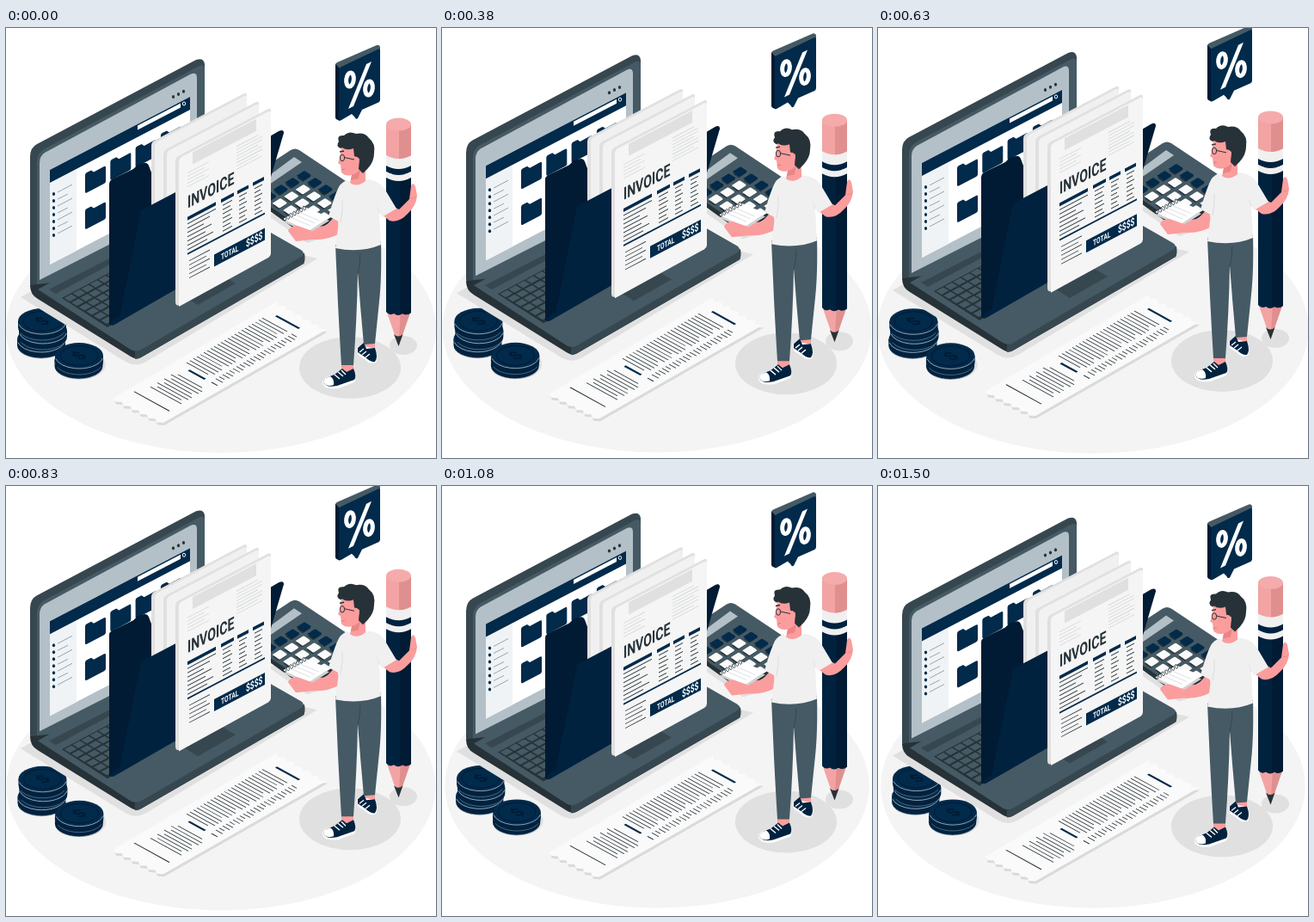
An HTML page with a canvas that plays this animation: 500x500 px, repeating every 1.54 s.

```html
<!DOCTYPE html>
<html lang="en">
<head>
<meta charset="utf-8">
<title>Invoice</title>
<style>
  html, body { margin: 0; width: 100%; height: 100%; overflow: hidden; background: #fff; }
  canvas { display: block; width: 500px; height: 500px; }
</style>
</head>
<body>
<canvas id="stage"></canvas>
<script>
const canvas = document.getElementById('stage');
const ctx = canvas.getContext('2d');
const ratio = Math.max(1, window.devicePixelRatio || 1);
canvas.width = canvas.height = 500 * ratio;

const LOOP = 1540, PEAK = 715, FPS = 24;
const NAVY = '#012a4b', DEEP = '#001b33', DUSK = '#00223f';
const SLATE = '#455a64', STEEL = '#37474f', INK = '#263238';
const MIST = '#b4c0c8', SHADE = '#e0e0e0', SKIN = '#fb9d9d', ROSE = '#f3a3a3', ROSE_DARK = '#e08f8f';

// Helpers
const fill = (color, d) => { ctx.fillStyle = color; ctx.fill(new Path2D(d)); };
const line = (color, width, d) => {
  ctx.strokeStyle = color;
  ctx.lineWidth = width;
  ctx.stroke(new Path2D(d));
};
const oval = (color, x, y, rx, ry) => {
  ctx.fillStyle = color;
  ctx.beginPath();
  ctx.ellipse(x, y, rx, ry, 0, 0, 7);
  ctx.fill();
};
const ring = (color, width, x, y, rx, ry, angle = 0, from = 0, to = 2 * Math.PI) => {
  ctx.strokeStyle = color;
  ctx.lineWidth = width;
  ctx.beginPath();
  ctx.ellipse(x, y, rx, ry, angle, from, to);
  ctx.stroke();
};
const group = (draw, ...matrix) => {
  ctx.save();
  ctx.transform(...matrix);
  draw();
  ctx.restore();
};
// Labels lie on the foreshortened sheet plane.
const text = (label, x, y, size, color) => group(() => {
  ctx.font = `700 ${size}px Roboto, sans-serif`;
  ctx.fillStyle = color;
  ctx.fillText(label, 0, 0);
}, .707, 0, 0, 1, x, y);

// Motion
const rise = t => 1 - Math.min(Math.abs(t - PEAK), LOOP - Math.abs(t - PEAK)) / (LOOP / 2);
const float = (t, height, draw) => group(draw, 1, 0, 0, 1, 0, height * (rise(0) - rise(t)));
const PULSE = [[0, 1], [380, .998], [630, 1.003], [830, .998], [1080, .987], [1540, .987]];
function pulse(t) {
  const i = PULSE.findIndex(([time]) => time > t);
  const [t0, a] = PULSE[i - 1], [t1, b] = PULSE[i];
  return a + (b - a) * (t - t0) / (t1 - t0);
}

function coin(x, y) {
  fill(DUSK, `M${x - 28} ${y}v7a28 15 0 0 0 56 0v-7z`);
  ring('#7c8fa1', .6, x, y + 7, 28, 15, 0, .4, 2.7);
  oval(NAVY, x, y, 28, 15);
  ring('#b9c5cf', .8, x, y, 28, 15, 0, .2, 2.9);
}

function coinFace(x, y) {
  ring(DEEP, 1, x, y, 22, 11.5);
  group(() => {
    ctx.font = '700 20px Roboto, sans-serif';
    ctx.textAlign = 'center';
    ctx.fillStyle = DEEP;
    ctx.fillText('$', 0, 7);
  }, .8, -.45, .8, .45, x, y);
}

function ground() {
  oval('#f4f4f4', 250, 350, 250, 144);
  oval(SHADE, 89, 391, 27, 17);
  coin(41, 362);
  coin(43, 352);
  coin(42, 341);
  coinFace(42, 341);
  coin(84.5, 386);
  coin(85, 381);
  coinFace(85, 381);
}

function calculator() {
  fill(SHADE, 'M300 215L350 250 363 246 380 225z');
  fill(INK, 'M296 170V205L346 241Q350 243 354 240L395 215V180z');
  fill(SLATE, 'M296 165L331 142Q336 139 341 142L395 178 390 208 354 233Q350 236 346 234L296 200z');
  fill(MIST, 'M300 176L335 150 344 156 306 182z');
  for (let i = 0; i < 4; i++) for (let j = 0; j < 5; j++) {
    const x = 305.5 + i * 13.5 + j * 12.5, y = 196 - i * 8 + j * 8;
    const tone = j === 0 || i === 3 ? NAVY : '#fafafa';
    fill(INK, `M${x - 8} ${y + 2}l7 5 9-6v-3z`);
    fill(tone, `M${x - 8} ${y}q0-1 1-1l7-4.5q1-.5 2 0l6 4q1 1 0 2l-7 4.5q-1 .5-2 0z`);
  }
}

function laptopScreen() {
  fill(STEEL, 'M28 150Q28 139 36 135L221 37Q230 34 231 42V230L45 310Q28 308 28 297z');
  fill(SLATE, 'M36 156Q36 146 44 141L223 45Q231 41 231 48V236L46 307Q36 308 36 299z');
  fill(MIST, 'M39 157Q39 149 45 145L214 54Q222 50 222 58V200L39 293z');
  fill('#fff', 'M51 165L214 80V190L51 275z');
  fill('#f0f3f5', 'M51 180L82 164V259L51 275z');
  fill(NAVY, 'M51 165L214 80V95L51 180z');
  for (let i = 0; i < 3; i++) oval(INK, 194.5 + i * 6, 80 - i * 3.1, 1.6, 2);
  fill('#fff', 'M153 113.5L203 87.5V92.5L153 118.5z');
  ring('#fff', 1, 207, 88, 1.7, 2);
  for (let i = 0; i < 7; i++) {
    const y = 193 + i * 8;
    oval(NAVY, 55.5, y, 1.6, 2);
    line('#7f909e', .8, `M60 ${y - 2}l${i % 2 ? 12 : 17} ${i % 2 ? -6 : -9}`);
  }
  const icon = (x, y) => fill(NAVY, `M${x} ${y + 7}q0-2 2-3l5-2.5 3 2 12-6.5q2-1 2 1v16q0 2-2 3l-20 10.5q-2 1-2-1z`);
  for (let i = 0; i < 4; i++) icon(92 + i * 29.3, 164 - i * 15.3);
  icon(92, 206);
}

function laptopBase() {
  fill(INK, 'M28 299Q28 310 37 315L145 382Q151 386 157 383L346 274Q348 272 347 262z');
  fill(STEEL, 'M150 374V385Q154 385 157 383L346 274Q348 271 347 262z');
  fill(SLATE, 'M37 304L231 194 343 258Q349 262 343 266L157 374Q151 377 145 374z');
  fill(STEEL, 'M50 304L126 265 132 269 58 309z');
  fill(INK, 'M65 314L170 258 220 288 118 348z');
  for (let row = 0; row < 6; row++) for (let col = 0; col < 10; col++) {
    const x = 67.5 + row * 8.6 + col * 10, y = 314 + row * 5.2 - col * 5.4;
    fill(SLATE, `M${x} ${y}l8.4-4.5 6.6 3.9-8.4 4.6z`);
  }
  fill(STEEL, 'M196 305L240 281 267 297 223 322z');
}

function sheet(x, y, tone, height) {
  fill('#e0e0e0', `M${x} ${y + 4}q0-4 3-6l105-55q3-1 3 2v${height}q0 4-4 6l-102 57q-5 2-5-4z`);
  fill(tone, `M${x + 4} ${y + 5}q0-4 3-6l101-53q3-1 3 2v${height}q0 3-3 5l-104 57z`);
}

function invoice() {
  sheet(197, 151, '#f5f5f5', 163);
  group(() => {
    ctx.fillStyle = SHADE;
    ctx.fillRect(20, 4, 74, 14);
    for (let i = 0; i < 8; i++) {
      line('#cfd3d6', .8, `M71 ${24 + i * 3.8}H${i % 3 ? 101 : 96}`);
      if (i < 5) line('#cfd3d6', .8, `M14 ${25 + i * 4}H${i % 2 ? 34 : 39}`);
    }
    text('INVOICE', 14, 66, 20, INK);
    const columns = [[14, 47], [53, 68], [72, 85], [90, 103]];
    for (const [from, to] of columns) line(NAVY, 4, `M${from} 78H${to}`);
    for (let row = 0; row < 7; row++) columns.forEach(([from, to], i) => {
      const end = i ? to - 2 - row % 2 * 2 : to - row * 7 % 16;
      line(INK, 1, `M${from + (i ? 2 : 0)} ${84 + row * 5}H${end}`);
    });
    line(NAVY, 2, 'M14 119H104');
    for (let i = 0; i < 5; i++) line(INK, .9, `M16 ${128 + i * 5}H${i % 2 ? 36 : 40}`);
    ctx.fillStyle = NAVY;
    ctx.fillRect(45, 136, 59, 14);
    text('TOTAL', 53, 146.5, 9.5, '#fff');
    text('$$$$', 82, 147, 12, '#fff');
  }, 1, -.525, 0, 1, 197, 151);
}

function receipt() {
  const teeth = (count, dx, dy) => Array.from({ length: count }, (_, i) =>
    i % 2 ? `l${dx + 3} ${dy - 2}` : `l${dx - 3} ${dy + 2}`).join('');
  const outline = `M315 318${teeth(12, 4.83, 2.7)}L183 459${teeth(12, -4.83, -2.4)}z`;
  group(() => fill('#dadada', outline), 1, 0, 0, 1, 1, 3);
  fill('#fafafa', outline);
  group(() => {
    line(NAVY, 2.2, 'M14 15H41');
    for (let s = 25, i = 0; s < 114; s += 4, i++) {
      line(INK, .8, `M8 ${s}H${i % 4 === 2 ? 33 : 37}M42 ${s}H${i % 3 ? 50 : 48}`);
    }
    line(NAVY, 2.2, 'M17 119.5H36');
    line(INK, 1, 'M43 119H50');
    for (let s = 130, i = 0; s < 160; s += 4, i++) line(INK, .8, `M${i % 2 ? 11 : 15} ${s}H${i % 3 ? 47 : 43}`);
    line(INK, 1, 'M6 172H47');
  }, 1, .55, -1, .59, 315, 318);
}

function pencil() {
  fill(ROSE, 'M442 328H471L456.5 370z');
  fill(ROSE_DARK, 'M459 328H471L456.5 370z');
  fill(INK, 'M451 356Q456 361 461.5 356L456.5 370z');
  fill(DUSK, 'M442 170H471V331Q466 335 461 332 456 336 451 332 446 335 442 330z');
  fill(DEEP, 'M458 170H471V331Q466 335 461 332L458 333z');
  const band = (top, bottom, tone) =>
    fill(tone, `M442 ${top}q14.5 8 29 0V${bottom}q-14.5 8-29 0z`);
  band(147, 160, '#f0f0f0');
  band(160, 167, DUSK);
  band(167, 174, '#f0f0f0');
  band(112, 148, ROSE);
  fill(ROSE_DARK, 'M457 112H471V148Q464 152 457 152z');
  oval('#f5abab', 456.5, 112, 14.5, 7.5);
}

function shoes() {
  fill(SKIN, 'M390 386H404V402H390zM416 363H429V377H417z');
  fill('#fff', 'M408 373Q409 369 416 370L430 373Q433 384 430 389 424 392 418 386L409 380z');
  fill(DUSK, 'M409 372L416 366 419 373 429 372Q433 383 429 388 424 389 418 383L409 377z');
  line('#fff', 1.3, 'M411 377L416 373M414 380L419 376M418 383L423 379');
  fill('#fff', 'M368 411Q370 405 382 403L406 402Q407 409 405 412L386 419Q368 421 368 411z');
  fill(DUSK, 'M369 411Q371 406 382 403L391 396 396 400 404 396Q408 405 405 409L385 416Q371 419 369 411z');
  fill('#fff', 'M369 411Q370 407 377 405 382 408 381 415 371 418 369 411z');
  line('#fff', 1.4, 'M382 403L388 408M386 400L392 405M390 398L395 403');
}

function head() {
  fill(SKIN, 'M390 138L388 152 386 157 389 159 390 168Q395 173 402 171L400 180Q408 186 418 178L418 150 410 136z');
  fill('#e98585', 'M402 171Q409 169 412 164L410 175 401 177z');
  fill(INK, 'M389 140Q383 137 387 132 384 124 393 125 399 119 407 123 417 121 422 128 430 134 428 146 428 155 421 163L415 169 410 164 411 152 405 149 404 140Q396 143 391 139z');
  oval(SKIN, 407, 155, 3.6, 5.5);
  ring(INK, 1, 391, 151, 2.6, 3.8);
  line(INK, 1, 'M393.5 150.5L405 153');
  line(INK, 1.3, 'M388 144L393 143');
  line('#d87878', .9, 'M390 165L394 164');
}

function person() {
  shoes();
  fill(SLATE, 'M383 252L436 248Q437 290 434 318L429 367 416 368Q412 325 409 284 408 340 404 392L390 392Q388 360 386 320z');
  line(STEEL, 1, 'M409 286Q412 274 412 262');
  fill(SKIN, 'M385 216L388 239Q374 247 356 246L337 248 328 236 333 231 342 233 372 230z');
  fill('#d2d2d2', 'M322 225L346 212 376 224 352 239z');
  fill('#fff', 'M322 222L347 208 376 220 352 236z');
  line('#d9dde0', .9, 'M333 221L354 230M338 218L359 227M343 215L364 224');
  for (let i = 0; i < 7; i++) ring(INK, .8, 324 + i * 3.8, 222 - i * 2.1, 1.5, 2.5, -.4);
  fill(SKIN, 'M328 235Q334 228 342 231L356 236 350 241 339 240z');
  fill('#f0f0f0', 'M396 177Q407 182 419 176 434 177 440 187L453 211 438 219 434 215 436 252Q412 262 383 256L387 225 375 219Q382 195 386 187 388 181 396 177z');
  line('#dcdcdc', 1, 'M389 226Q392 212 391 201M434 215L430 201');
  head();
}

function grip() {
  fill(SKIN, 'M437 217L451 208 457 211 469 199 471 184Q473 178 476 184L478 195Q477 207 467 216 457 227 446 224z');
  fill('#f0f0f0', 'M428 184Q437 180 442 190L454 210 437 220 429 202z');
  line('#e98585', .8, 'M471 198Q475 199 477 196');
}

function bubble() {
  fill(SLATE, 'M383 43Q383 41 385 40L431 20Q434 19 435 22V29L388 50z');
  fill(DEEP, 'M383 42L388 47V108L384 106Q383 105 383 104z');
  fill(NAVY, 'M387 49Q387 46 390 45L432 25Q435 23 435 27V83Q435 86 432 87L414 95 409 105Q407 107 405 103L402 100 390 107Q387 109 387 105z');
  ring('#fff', 5, 400, 60, 4.3, 8, .12);
  ring('#fff', 5, 422, 70, 4.3, 8, .12);
  fill('#fff', 'M419 42L425 39 404 91 398 94z');
}

function desk(t) {
  fill(SHADE, 'M17 313L40 300 345 264 362 268 163 388Q151 395 139 388z');
  oval(SHADE, 400, 395, 59, 36);
  oval(SHADE, 462, 369, 16, 11);
  calculator();
  laptopScreen();
  laptopBase();
  fill(DEEP, 'M300 130L317 120Q323 117 323 122L306 180z');
  fill(DEEP, 'M120 181Q120 178 123 176L148 164 153 159 160 157Q164 156 166 160L169 168 197 155V303L125 345Q120 347 120 342z');
  sheet(169, 133, '#f0f0f0', 70);
  float(t, 8, () => sheet(183, 143, '#f2f2f2', 80));
  fill(DUSK, 'M155 216Q156 212 159 211L199 190V303L126 345Q121 347 122 342L132 334z');
  line(DEEP, 1.2, 'M156 215L131 337');
  float(t, 10, invoice);
  receipt();
  pencil();
  person();
  grip();
}

// Poses advance in steps of 1/24 s, on a 10 ms clock.
const hold = t => Math.floor((t + 5) * FPS / 1000) * 1000 / FPS;

function frame(now) {
  const t = Math.min(hold(now % LOOP), 1500), size = pulse(t);
  ctx.setTransform(ratio, 0, 0, ratio, 0, 0);
  ctx.clearRect(0, 0, 500, 500);
  group(ground, size, 0, 0, size, 250 - 250 * size, 250 - 250 * size);
  float(t, 10, () => desk(t));
  float(t, 27.5, bubble);
}

const start = performance.now();
function tick() {
  frame(performance.now() - start);
  requestAnimationFrame(tick);
}
tick();
</script>
</body>
</html>
```
